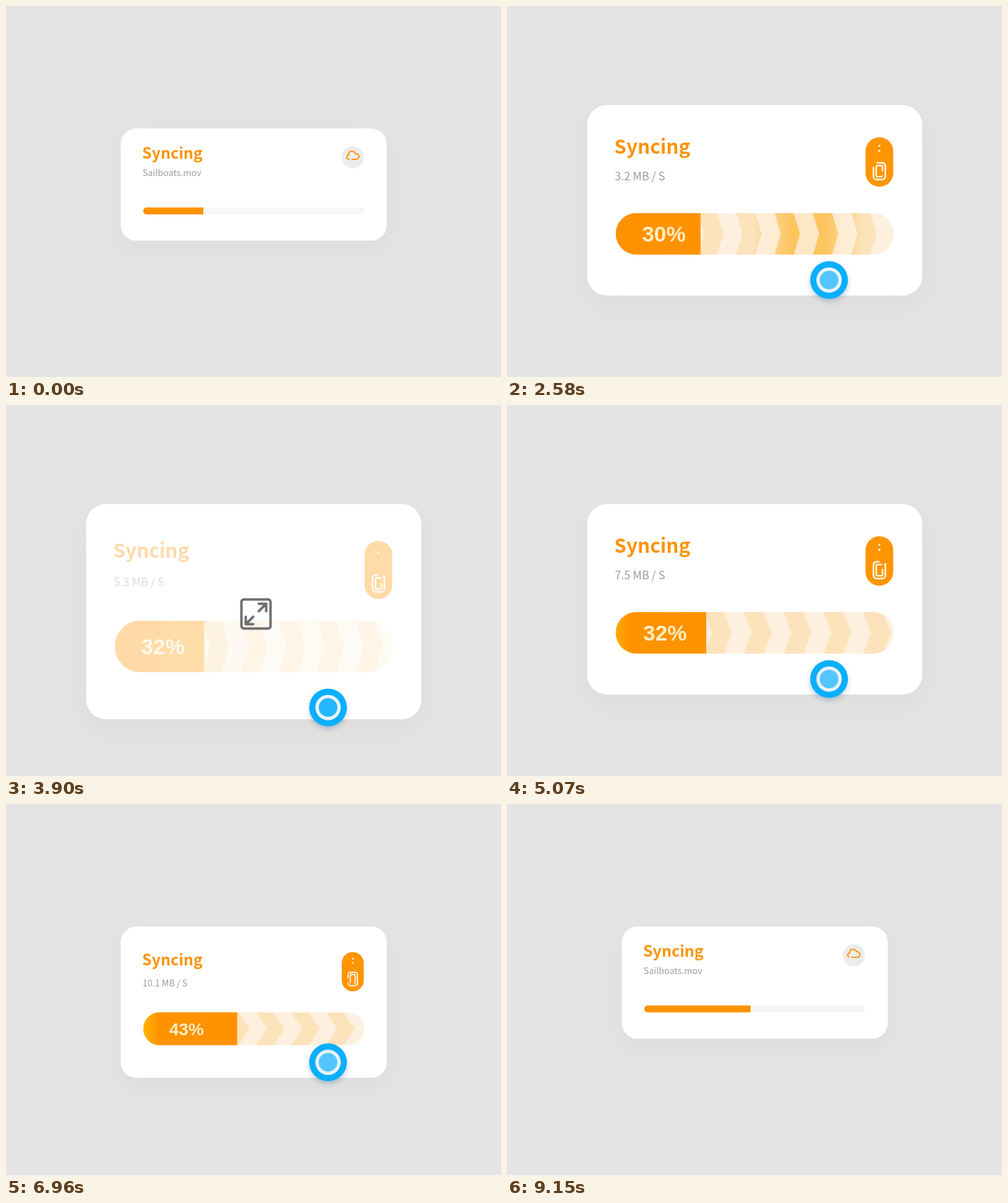
Recreate the animation shown at these times as an HTML page with a canvas. Size 800 by 600 pixels, loop 9180 ms.

```html
<!DOCTYPE html>
<html lang="en">
<head>
<meta charset="utf-8">
<title>Syncing card</title>
<style>
  html, body { margin: 0; width: 100%; height: 100%; overflow: hidden; background: #e4e4e4; }
  canvas { display: block; }
</style>
</head>
<body>
<canvas id="stage" width="800" height="600"></canvas>
<script>
const ctx = document.getElementById('stage').getContext('2d');
const LOOP = 9180;
const SANS = '"Noto Sans CJK JP", "Noto Sans CJK SC", "Noto Sans CJK", "Noto Sans", sans-serif';
const ORANGE = '#ff9200';
const CARD_W = 430, BAR_X = 36.5, BAR_W = 357, PILL_X = 375;

const clamp = v => Math.max(0, Math.min(1, v));
const lerp = (a, b, u) => a + (b - a) * u;
const mod = (a, n) => ((a % n) + n) % n;
const mix = (a, b, u) => `rgb(${a.map((v, i) => Math.round(lerp(v, b[i], u)))})`;
// Eased 0 to 1 between two times in ms.
const ramp = (t, from, to) => (1 - Math.cos(Math.PI * clamp((t - from) / (to - from)))) / 2;

function stateAt(t) {
  const s = t / 1000;
  const pull = ramp(t, 3000, 3900) - ramp(t, 3960, 4850);
  const open = ramp(t, 1150, 2300) - ramp(t, 7470, 7870);
  const rush = ramp(t, 4700, 6000);
  const progress = .272 + .05 * clamp(s / 3.9) + .159 * ramp(t, 4700, 8500);
  return {
    t, pull, open, rush, progress,
    zoom: ramp(t, 580, 1180) - ramp(t, 6317, 6917),
    hot: ramp(t, 1450, 2100) - ramp(t, 7600, 8060),
    lively: ramp(t, 900, 1500) - ramp(t, 7900, 8300),
    roll: ramp(t, 1800, 2200) - ramp(t, 7600, 8000),
    touch: ramp(t, 780, 1000) - ramp(t, 7470, 7740),
    touchDrop: 46 * (1 - ramp(t, 850, 1250)),
    percent: Math.floor(100 * progress + 1.5 * rush),
    speed: Math.max(0, Math.min(10.1, 3.2 + 1.425 * (s - 2.58) + .126 * (s - 2.58) ** 2)),
    pitch: 49.2 + 7.8 * ramp(t, 3900, 7500),
    phase: .55 + 1.65 * s,
    slope: .3 + .37 * rush,
    sweep: mod(.676 * s - .854, 1.26) - .2,
    // Three layout stops: closed, open, overstretched.
    fit: (a, b, c) => lerp(a, b, open) + (c - b) * pull
  };
}

const box = (x, y, w, h, r) => { ctx.beginPath(); ctx.roundRect(x, y, w, h, r); };
function disc(x, y, r, fill) {
  ctx.beginPath();
  ctx.arc(x, y, r, 0, Math.PI * 2);
  ctx.fillStyle = fill;
  ctx.fill();
}
function shadow(color, blur, dy) {
  ctx.shadowColor = color;
  ctx.shadowBlur = blur;
  ctx.shadowOffsetY = dy;
}
function write(text, x, y, font, fill) {
  ctx.font = font;
  ctx.fillStyle = fill;
  ctx.fillText(text, x, y);
}

function sweepFill(center, rgb, peak) {
  const reach = .2 * BAR_W, x = BAR_X + center * BAR_W;
  const g = ctx.createLinearGradient(x - reach, 0, x + reach, 0);
  g.addColorStop(0, `rgba(${rgb},0)`);
  g.addColorStop(.36, `rgba(${rgb},${peak})`);
  g.addColorStop(.64, `rgba(${rgb},${peak})`);
  g.addColorStop(1, `rgba(${rgb},0)`);
  return g;
}

function chevrons({ pitch, slope, phase }, y, h) {
  const mid = Math.max(h / 2, 24), dx = slope * mid;
  ctx.beginPath();
  for (let i = -1; i < 10; i++) {
    const tip = BAR_X + (phase % 1 + i) * pitch, tail = tip - pitch / 2;
    ctx.moveTo(tail - dx, y);
    ctx.lineTo(tip - dx, y);
    ctx.lineTo(tip, y + mid);
    ctx.lineTo(tip - dx, y + 2 * mid);
    ctx.lineTo(tail - dx, y + 2 * mid);
    ctx.lineTo(tail, y + mid);
    ctx.closePath();
  }
}

function drawBar(st, y, h) {
  const { hot, lively, sweep } = st;
  const glow = lively * (1 - .85 * st.pull);
  const heat = glow * lerp(.55, .9, st.rush);

  ctx.save();
  box(BAR_X, y, BAR_W, h, h / 2);
  ctx.clip();
  ctx.fillStyle = mix([246, 246, 246], [253, 240, 223], hot);
  ctx.fillRect(BAR_X, y, BAR_W, h);

  chevrons(st, y, h);
  ctx.globalAlpha = lively;
  ctx.fillStyle = mix([253, 240, 233], [252, 227, 187], hot);
  ctx.fill();
  ctx.globalAlpha = hot;
  ctx.fillStyle = sweepFill(sweep, '255,174,28', heat);
  ctx.fill();
  ctx.fillStyle = sweepFill(sweep, '255,190,70', heat * .3);
  ctx.fillRect(BAR_X, y, BAR_W, h);

  ctx.globalAlpha = 1;
  const done = BAR_W * st.progress;
  ctx.fillStyle = ORANGE;
  ctx.fillRect(BAR_X, y, done, h);
  ctx.fillStyle = sweepFill(sweep, '255,213,0', glow);
  ctx.fillRect(BAR_X, y, done, h);

  ctx.globalAlpha = clamp((h - 30) / 18);
  write(st.percent + '%', 70.3 + 8 * st.rush, y + h / 2 + 10,
    'bold 28px "Liberation Sans", Arial, sans-serif', '#ffecbe');
  ctx.restore();
}

const cloud = new Path2D('M-4 6.3H5.5C9 6.3 10.4 4 10 1.6C9.5-1 7.5-2.8 4.8-2.6' +
  'C3.8-5.8 0-7.3-3-6.6C-6-5.8-7-3-6.6-.6C-9 0-10.3 2-9.8 4C-9.2 5.8-7 6.3-4 6.3');
const CLOUD_LEN = 58;

function drawCloud(turn, x, y) {
  ctx.save();
  ctx.translate(x, y);
  ctx.lineWidth = 2;
  ctx.lineCap = 'round';
  ctx.strokeStyle = ORANGE;
  const gap = 9;
  ctx.setLineDash([CLOUD_LEN - gap, gap]);
  ctx.lineDashOffset = -(turn * CLOUD_LEN + 56 + gap / 2) % CLOUD_LEN;
  ctx.stroke(cloud);
  ctx.restore();
}

function drawPhone(turn, x, y) {
  ctx.lineWidth = 1.9;
  ctx.lineCap = 'round';
  ctx.strokeStyle = '#fff';
  const ring = (w, h, r, gap, offset) => {
    const len = 2 * (w + h) - (8 - 2 * Math.PI) * r;
    box(x - w / 2, y - h / 2, w, h, r);
    ctx.setLineDash([len - gap, gap]);
    ctx.lineDashOffset = offset * len;
    ctx.stroke();
  };
  ring(15.2, 21.6, 4, 9, .24 - turn);
  ring(8, 14.4, 2, 7, .3 + turn);
}

function drawPill(st, y, h) {
  const { t, hot, fit } = st, turn = t / LOOP * 8;
  ctx.save();
  box(PILL_X - 17.8, y, 35.6, h, 17.8);
  ctx.fillStyle = mix([235, 236, 236], [255, 149, 0], hot);
  ctx.fill();
  ctx.clip();

  ctx.globalAlpha = 1 - hot;
  drawCloud(turn, PILL_X, y + 15 + hot * 8);

  const beat = (t % 900) / 900;
  [.2, .5, .9].forEach((start, i) => {
    ctx.globalAlpha = hot * clamp((beat - start) / .08) * clamp((1 - beat) / .04);
    disc(PILL_X, y + fit(35, 11, 14.7) + i * fit(6.5, 6.5, 4.8), 1.3, '#fff');
  });
  ctx.globalAlpha = hot * clamp((st.open - .35) / .5);
  drawPhone(turn, PILL_X, y + h - 20);
  ctx.restore();
}

function drawSubtitle({ roll, speed }, base) {
  const line = 24, font = '14.3px ' + SANS, gray = '#9d9d9d';
  ctx.save();
  ctx.beginPath();
  ctx.rect(30, base - 18, 260, 26);
  ctx.clip();
  write(speed.toFixed(1) + ' MB / S', 35.4, base - (1 - roll) * line, font, gray);
  write('Sailboats.mov', 35.4, base + roll * line, font, gray);
  ctx.restore();
}

function drawExpand(x, y, alpha) {
  ctx.save();
  ctx.globalAlpha = alpha;
  ctx.translate(x, y);
  ctx.strokeStyle = '#707070';
  ctx.lineWidth = 4;
  ctx.lineCap = ctx.lineJoin = 'round';
  box(-23.5, -23.5, 47, 47, 4);
  ctx.stroke();
  for (const d of [1, -1]) {
    const near = d * 4.5, far = d * 16.5;
    ctx.beginPath();
    ctx.moveTo(near, -near);
    ctx.lineTo(far, -far);
    ctx.moveTo(near, -far);
    ctx.lineTo(far, -far);
    ctx.lineTo(far, -near);
    ctx.stroke();
  }
  ctx.restore();
}

function drawTouch(x, y, alpha, press) {
  ctx.save();
  ctx.globalAlpha = alpha;
  shadow('rgba(20,90,150,.28)', 8, 4);
  disc(x, y, 30.5, '#0aafff');
  shadow('transparent', 0, 0);
  disc(x, y, 20.5, '#ebf3f8');
  disc(x, y, 15, '#12b0ff');
  disc(x, y, 15, `rgba(255,255,255,${press})`);
  ctx.restore();
}

function draw(t) {
  const st = stateAt(t), { fit, zoom, pull } = st;
  const scale = lerp(1, 1.259, zoom);
  const left = 400.4 - CARD_W * scale / 2, top = lerp(198.1, 160.2, zoom);
  const height = fit(181.5, 244.6, 276.4);
  const bottom = top + height * scale;

  ctx.fillStyle = '#e4e4e4';
  ctx.fillRect(0, 0, 800, 600);

  ctx.save();
  ctx.translate(left, top);
  ctx.scale(scale, scale);
  shadow('rgba(150,110,80,.07)', 34 * scale, 12 * scale);
  box(0, 0, CARD_W, height, 25);
  ctx.fillStyle = '#fff';
  ctx.fill();
  shadow('transparent', 0, 0);

  write('Syncing', 34.6, fit(49, 62.7, 69.1), 'bold 25px ' + SANS, '#fd9305');
  drawSubtitle(st, fit(76.6, 96.6, 105.6));
  drawBar(st, fit(127.5, 138.6, 149.7), fit(11.6, 53.6, 66.3));
  drawPill(st, fit(28.5, 41.3, 47.3), fit(36, 63.6, 74.7));

  // White veil over the content while the card is overstretched.
  ctx.fillStyle = `rgba(255,255,255,${.66 * pull})`;
  box(0, 0, CARD_W, height, 25);
  ctx.fill();
  ctx.restore();

  drawExpand(404, (top + bottom) / 2 + 3.8, pull);
  drawTouch(520.5, bottom - fit(24, 25, 19) + st.touchDrop, st.touch, .28 - .2 * pull);
}

const start = performance.now();
function frame() {
  draw((performance.now() - start) % LOOP);
  requestAnimationFrame(frame);
}
draw(0);
requestAnimationFrame(frame);
</script>
</body>
</html>
```
